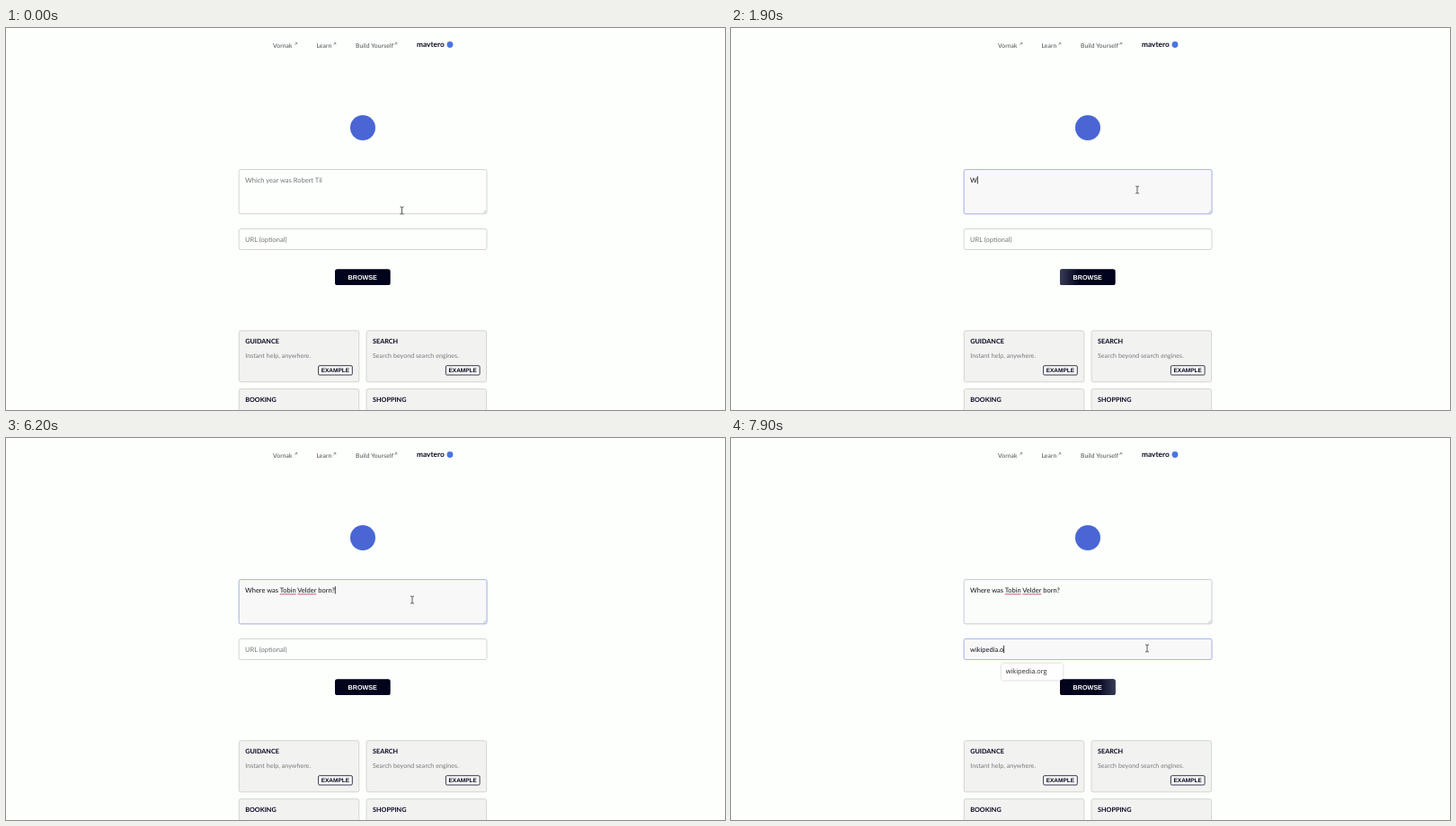
Write an HTML page that moves like this. It is 800 by 425 pixels and loops after 8 s.

```html
<!DOCTYPE html>
<html lang="en">
<head>
<meta charset="utf-8">
<title>Browse prompt</title>
<style>
  html, body { margin: 0; width: 100%; height: 100%; overflow: hidden; background: #fdfffc; }
  svg { display: block; width: 100vw; height: 100vh; }
  text { white-space: pre; text-rendering: geometricPrecision; font-family: Lato, "Open Sans", sans-serif; }
  .nav { font-size: 6.8px; letter-spacing: .1px; fill: #4c4c52; }
  .brand { font-size: 8.3px; font-weight: 700; fill: #08081c; }
  .field { font-size: 7.5px; fill: #111118; }
  .hint { font-size: 7.5px; fill: #757577; }
  .title { font-size: 7.25px; font-weight: 700; fill: #05051e; }
  .desc { font-size: 7px; letter-spacing: .07px; fill: #747478; }
  .btn { font: 700 7.2px "Liberation Sans", Arial, sans-serif; fill: #fff; text-anchor: middle; }
  .tag { font: 700 6.5px "Liberation Sans", Arial, sans-serif; fill: #05051e; text-anchor: middle; }
  .item { font: 7.4px "Open Sans", "Noto Sans", sans-serif; fill: #2c2c2e; }
  .box { fill: #fdfffd; stroke: #d3d5d3; }
  .focus { fill: #f9f8f9; stroke: #a9b9ea; }
  .card { fill: #f2f3f1; stroke: #d3d5d3; }
  .menu { fill: #fdfefd; filter: drop-shadow(0 .8px 1.4px rgba(0, 0, 0, .22)); }
</style>
</head>
<body>
<svg id="stage" viewBox="0 0 800 425" xmlns="http://www.w3.org/2000/svg">
  <defs>
    <linearGradient id="sheen">
      <stop offset="0" stop-color="#3b4058" stop-opacity="0"/>
      <stop offset=".5" stop-color="#3b4058" stop-opacity=".9"/>
      <stop offset="1" stop-color="#3b4058" stop-opacity="0"/>
    </linearGradient>
    <clipPath id="btnClip"><rect x="366" y="268.3" width="61.7" height="17.8" rx="2.6"/></clipPath>
  </defs>
</svg>
<script>
const LOOP = 8000, STEP = 100;
const stage = document.getElementById('stage');

function add(tag, attrs, txt) {
  const el = document.createElementNS(stage.namespaceURI, tag);
  for (const k in attrs) el.setAttribute(k, attrs[k]);
  if (txt !== undefined) el.textContent = txt;
  return stage.appendChild(el);
}
const text = (cls, x, y, txt) => add('text', { class: cls, x, y }, txt);
const rect = (cls, x, y, width, height, rx = 2) =>
  add('rect', { class: cls, x, y, width, height, rx });
const show = (el, on) => el.setAttribute('visibility', on ? 'visible' : 'hidden');
const ramp = (t, a, b) => Math.min(1, Math.max(0, (t - a) / (b - a)));
const ease = p => p * p * (3 - 2 * p);

// Header
for (const [label, x, ax] of [['Vornak', 297, 321.3], ['Learn', 345.5, 364.3], ['Build Yourself', 389, 432.3]]) {
  text('nav', x, 21.7, label);
  add('path', { d: `M${ax} 18.9l2.4-2.4m-1.8 0h1.9v1.9`, fill: 'none', stroke: '#66666c', 'stroke-width': .6 });
}
text('brand', 457, 21.4, 'mavtero');
add('circle', { cx: 494, cy: 18.5, r: 3.4, fill: '#4a74e0' });
add('circle', { cx: 397, cy: 111, r: 14, fill: '#4966d4' });

// Form
rect('box', 259.2, 157.5, 275.8, 49.3);
const areaFocus = rect('focus', 259.2, 157.5, 275.8, 49.3);
add('path', { d: 'M531 205.8l3-3m-1.2 3l1.2-1.2', stroke: '#8a8a8e', 'stroke-width': .5 });
rect('box', 259.2, 223.5, 275.8, 23);
const urlFocus = rect('focus', 259.2, 223.5, 275.8, 23);

const question = text('hint', 266, 172, '');
const typed = text('field', 266, 172, '');
const urlHint = text('hint', 266, 237.8, 'URL (optional)');
const url = text('field', 266, 237.8, '');
const marks = [0, 1].map(() => add('path', { fill: 'none', stroke: '#d8436a', 'stroke-width': .9 }));

add('rect', { x: 366, y: 268.3, width: 61.7, height: 17.8, rx: 2.6, fill: '#02031c' });
const glow = add('rect', { y: 268, width: 40, height: 19, fill: 'url(#sheen)' });
const glowWrap = add('g', { 'clip-path': 'url(#btnClip)' });
glowWrap.append(glow);
text('btn', 396.7, 279.5, 'BROWSE');

// Cards
function card(x, y, title, desc) {
  rect('card', x + .3, y, 133.5, 57);
  text('title', x + 7.2, y + 14.5, title);
  if (!desc) return;
  text('desc', x + 7.2, y + 29.8, desc);
  add('rect', { x: x + 88.6, y: y + 38.9, width: 37.7, height: 10.3, rx: 1.2,
    fill: '#fafbfa', stroke: '#23233a', 'stroke-width': .9 });
  text('tag', x + 107.4, y + 46.4, 'EXAMPLE');
}
card(259, 336.8, 'GUIDANCE', 'Instant help, anywhere.');
card(400.8, 336.8, 'SEARCH', 'Search beyond search engines.');
card(259, 401.6, 'BOOKING');
card(400.8, 401.6, 'SHOPPING');

// Suggestions
const menu = rect('menu', 301, 251, 103, 95);
const items = ['wikipedia.org', 'example.org', 'https://agent-connect...', 'https://vornak.com/',
  'https://pyfiddle.net/', 'pyfiddle.net'].map((s, i) => text('item', 305.7, 262.4 + i * 15.35, s));

const caret = add('rect', { width: .8, height: 8.4, fill: '#111' });
const pointer = add('path', { d: 'M-2-4.1Q0-4.1 0-3Q0-4.1 2-4.1M0-3V3M-2 4.1Q0 4.1 0 3Q0 4.1 2 4.1',
  fill: 'none', stroke: '#48484c', 'stroke-width': .9 });

// Typing: one time per key
const QUESTION = 'Which year was Robert Tilstead born?';
const ANSWER = 'Where was Tobin Velder born?';
const SITE = 'wikipedia.o';
const ANSWER_KEYS = [19, 20, 21, 23, 24, 25, 26, 28, 29, 30, 41, 43, 44, 45, 46, 46,
  48, 49, 50, 52, 53, 54, 55, 57, 58, 59, 60, 62].map(k => k * 100);
const SITE_KEYS = [73, 74, 75, 75, 76, 76, 77, 77, 78, 79, 79].map(k => k * 100);
const WORDS = [[10, 15, 4600], [16, 22, 5500]];
const AREA_AT = 1400, URL_AT = 6800;

const pressed = (keys, t) => keys.filter(k => k <= t);

const PATH = [[0, 440.5, 203], [900, 452, 180], [6500, 452, 180], [6800, 463, 234], [LOOP, 463, 234]];
function pointerAt(t) {
  const i = PATH.findIndex((p, n) => n && t <= p[0]);
  const [a, b] = [PATH[i - 1], PATH[i]];
  const p = ease(ramp(t, a[0], b[0]));
  return [a[1] + (b[1] - a[1]) * p, a[2] + (b[2] - a[2]) * p];
}

function draw(t) {
  const inUrl = t >= URL_AT;
  const aKeys = pressed(ANSWER_KEYS, t), sKeys = pressed(SITE_KEYS, t);

  question.textContent = QUESTION.slice(0, 25 + t / STEP);
  show(question, !aKeys.length);
  typed.textContent = ANSWER.slice(0, aKeys.length);
  url.textContent = SITE.slice(0, sKeys.length);
  show(urlHint, !sKeys.length);

  areaFocus.setAttribute('opacity', ramp(t, AREA_AT - 100, AREA_AT + 200) * (1 - .75 * ramp(t, URL_AT - 100, URL_AT + 200)));
  urlFocus.setAttribute('opacity', ramp(t, URL_AT - 100, URL_AT + 200));

  WORDS.forEach(([from, to, at], i) => {
    show(marks[i], t >= at);
    if (t < at) return;
    const x = 266 + typed.getSubStringLength(0, from);
    marks[i].setAttribute('d', `M${x} 173.8h${typed.getSubStringLength(from, to - from)}`);
  });

  const line = inUrl ? url : typed;
  const keys = inUrl ? sKeys : aKeys;
  const last = keys.length ? keys[keys.length - 1] : inUrl ? URL_AT : AREA_AT;
  caret.setAttribute('x', 266.1 + (keys.length ? line.getComputedTextLength() : 0));
  caret.setAttribute('y', inUrl ? 230.8 : 165);
  show(caret, t >= AREA_AT && (t - last + 100) % 1000 < 500);

  const open = t >= 6900, narrow = sKeys.length > 0;
  show(menu, open);
  menu.setAttribute('width', narrow ? 68 : 103);
  menu.setAttribute('height', narrow ? 18.3 : 95);
  items.forEach((el, i) => show(el, open && (!narrow || i === 0)));

  // The button's sheen drifts left, once every 7 s
  const phase = t >= 7000 ? t - 7000 : t;
  glow.setAttribute('x', 395 - (phase - 1100) * .06);

  pointer.setAttribute('transform', `translate(${pointerAt(t)})`);
}

const start = performance.now();
function tick(now) {
  const t = Math.max(0, now - start) % LOOP;
  draw(Math.floor(t / STEP) * STEP);
  requestAnimationFrame(tick);
}
draw(0);
requestAnimationFrame(tick);
</script>
</body>
</html>
```
